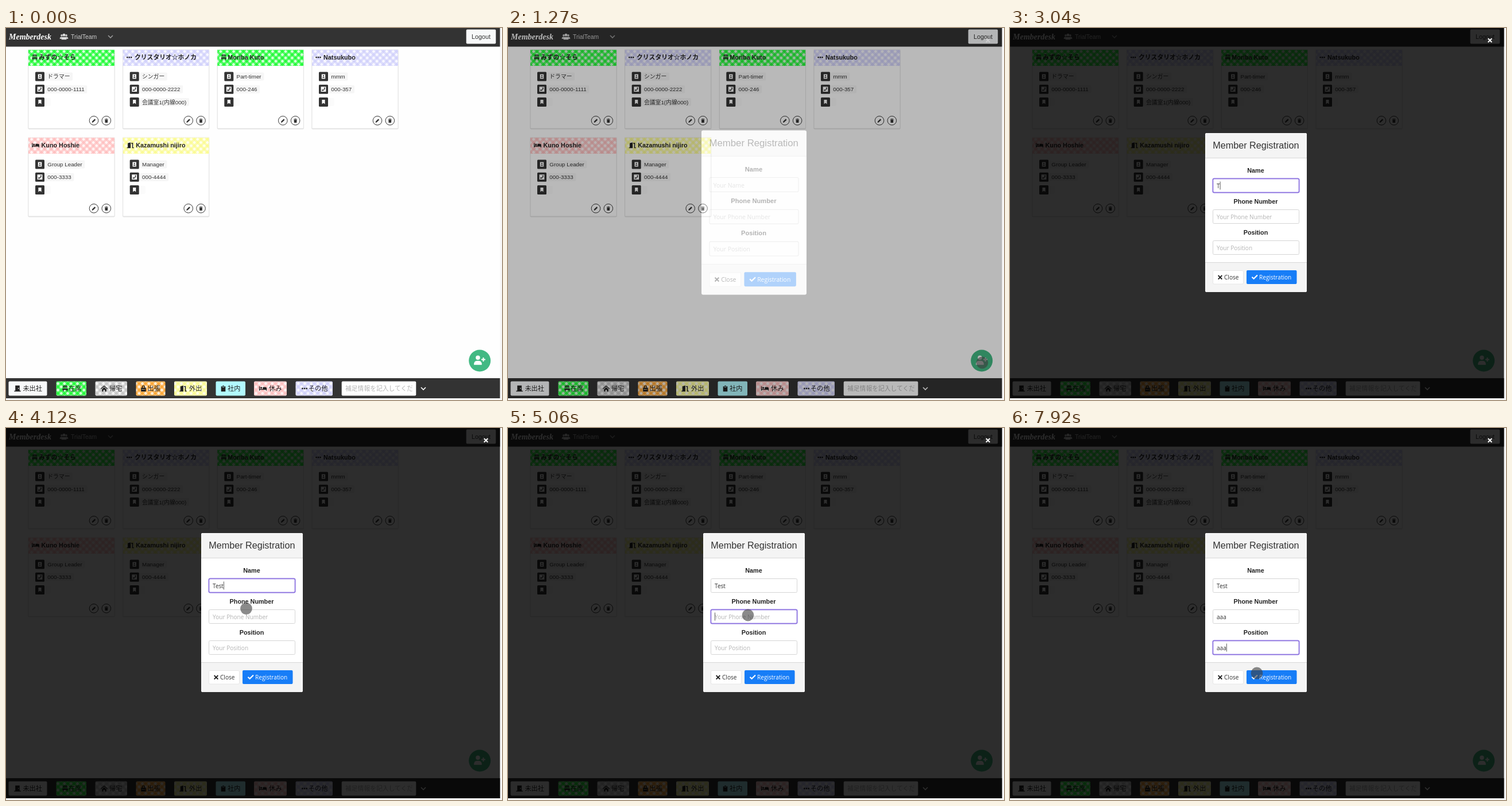
Write an HTML page that moves like this. It is 864 px wide and 648 px high and loops after 8 s.

```html
<!DOCTYPE html>
<html lang="ja">
<head>
<meta charset="utf-8">
<title>Member board</title>
<style>
html, body { margin: 0; width: 100%; height: 100%; overflow: hidden; background: #f7f7f7; }
svg { display: block; width: 864px; height: 648px; font: 9.8px "Liberation Sans", "Noto Sans CJK JP", "Noto Sans CJK", sans-serif; fill: #333; }
text { white-space: pre; }
.name, .label { font-size: 10.8px; font-weight: bold; fill: #222; }
.ui { font: 10.1px "Open Sans", "Noto Sans", sans-serif; }
.label, .mid { text-anchor: middle; }
.end { text-anchor: end; }
</style>
</head>
<body>
<svg id="stage" viewBox="0 0 864 648"></svg>
<script>
const LOOP = 8000;
const svg = document.getElementById('stage');

const COLORS = {
  green: '#00fa1a', lavender: '#ccccfa', pink: '#ffb8b8', yellow: '#fafa86',
  orange: '#ff9a18', gray: '#bebebe', cyan: '#b2f9ff', white: '#f8f9fa'
};
const PLAIN = ['cyan', 'white'];
const paint = c => PLAIN.includes(c) ? COLORS[c] : `url(#${c})`;

// Glyphs are centred on 0,0.
const GLYPHS = {
  chair: 'M-4-1v-3q0-1.5 1.5-1.5h5q1.5 0 1.5 1.5v3h-1.3v-3h-1v3h-1.1v-3h-1.2v3h-1.1v-3h-1v3zM-5 0h10v2.5h-1v3h-1.3v-3h-5.4v3h-1.3v-3h-1z',
  door: 'M-6 4h2v-9.5h8v9.5h2v1.5h-12zM1-1h1.6v1.6h-1.6z',
  doorOpen: 'M-6.5 4h1.5v-8l5.5-1.5v11h-7zM1.5-4.5h3.5v8.5h1.5v1.5h-3.2v-8.5h-1.8z',
  home: 'M-6.5 0L0-5.5 6.5 0l-1 1L0-3.7-5.5 1zM-4 1.2L0-2.3 4 1.2v4.3h-2.6v-3h-2.8v3h-2.6z',
  bag: 'M-4.5-1.5h1.7v-2q0-2 2-2h1.6q2 0 2 2v2h1.7v7h-9zM-1.4-1.5h2.8v-2.4h-2.8zM-3 1h6v.9h-6z',
  clip: 'M-4-4h2.5q0-1.5 1.5-1.5t1.5 1.5h2.5v9.5h-8zM-2-2.5h4v-1h-4z',
  bed: 'M-7-4h1.4v5h5.4v-3.6h4.4q2.8 0 2.8 2.6v4h-1.4v-1.6h-11.2v1.6h-1.4zM-4.8-1.2a1.7 1.7 0 1 1 3.4 0a1.7 1.7 0 1 1-3.4 0z',
  dots: 'M-5-1.2h2.5v2.4h-2.5zM-1.2-1.2h2.5v2.4h-2.5zM2.6-1.2h2.5v2.4h-2.5z',
  pencil: 'M-4 4l.7-2.7L1.8-3.8 3.8-1.8-1.3 3.3z',
  trash: 'M-3.5-3.6h2.2l.6-.8h1.4l.6.8h2.2v1h-7zM-3-2h6l-.4 6h-5.2z',
  times: 'M-4-2.6l1.4-1.4L0-1.4 2.6-4 4-2.6 1.4 0 4 2.6 2.6 4 0 1.4-2.6 4-4 2.6-1.4 0z',
  check: 'M-5.5.5l1.5-1.6 2.4 2.3L4-4.2 5.5-2.7-1.6 4.3z',
  id: 'M-4-5h8v10h-8zM-1.4-1.8a1.4 1.4 0 1 1 2.8 0a1.4 1.4 0 1 1-2.8 0zM-2.4 2.8q0-2.2 2.4-2.2t2.4 2.2z',
  phone: 'M-5.5-5.5h11v11h-11zM-3.6 3.6q7.2 0 7.2-7.2l-1.9-.4-1 2.3 1 .8q-.7 1.5-2.2 2.2l-.8-1-2.3 1z',
  bookmark: 'M-3.2-5h6.4v9.6L0 2l-3.2 2.6z',
  person: 'M-3-3.5a3 3 0 1 1 6 0a3 3 0 1 1-6 0zM-5.5 6.5q0-5.5 4-5.5h3q4 0 4 5.5z',
  plus: 'M-1-3.5h2v2.5h2.5v2h-2.5v2.5h-2v-2.5h-2.5v-2h2.5z'
};

const rect = (x, y, w, h, fill, extra = '') =>
  `<rect x="${x}" y="${y}" width="${w}" height="${h}" fill="${fill}" ${extra}/>`;
const text = (x, y, s, extra = '') => `<text x="${x}" y="${y}" ${extra}>${s}</text>`;
const glyph = (name, x, y, fill = '#333', k = 1) =>
  `<path d="${GLYPHS[name]}" fill="${fill}" fill-rule="evenodd" transform="translate(${x} ${y}) scale(${k})"/>`;
const chevron = (x, y, color) =>
  `<path d="M${x - 4} ${y - 2}l4 4 4-4" fill="none" stroke="${color}" stroke-width="1.6"/>`;

const gingham = ([id, c]) => `<pattern id="${id}" width="8" height="8" patternUnits="userSpaceOnUse" patternTransform="rotate(45)">
  ${rect(0, 0, 8, 8, '#fff')}${rect(0, 0, 8, 8, c, 'opacity=".15"')}
  ${rect(0, 0, 4, 8, c, 'opacity=".6"')}${rect(0, 0, 8, 4, c, 'opacity=".6"')}</pattern>`;

function card(x, y, color, icon, name, nameX, lines) {
  const row = (kind, i) => {
    const cy = 46.5 + i * 22.2, s = lines[i] || '';
    return rect(12, cy - 8, 16, 16, '#333', 'rx="1.5"') + glyph(kind, 20, cy, '#fff', .8) +
      `<g class="pill">${rect(29, cy - 7, 10, 14, s ? '#f6f6f6' : '#fbfbfb', 'rx="2"')}${text(33.3, cy + 3.7, s)}</g>`;
  };
  const round = (kind, cx) =>
    `<circle cx="${cx}" cy="123.3" r="7.8" fill="none" stroke="#333"/>` + glyph(kind, cx, 123.5, '#333', .85);
  return `<g transform="translate(${x} ${y})">
    ${rect(-.5, .5, 151, 138, '#000', 'opacity=".1" rx="2"')}
    ${rect(0, 0, 150, 137, '#fff', 'stroke="#dedede" stroke-width=".8"')}
    ${rect(0, 0, 150, 28, paint(color))}
    ${glyph(icon, icon === 'bed' ? 12.5 : icon === 'doorOpen' ? 13 : 11, 13.2, '#222', .92)}
    ${text(nameX, 17, name, 'class="name"')}
    ${['id', 'phone', 'bookmark'].map(row).join('')}
    ${round('pencil', 114)}${round('trash', 135.8)}</g>`;
}

function status(x1, x2, color, icon, label) {
  return rect(x1 - .5, 615.5, x2 - x1 + 1, 25, paint(color), 'rx="2"') +
    glyph(icon, x1 + (icon === 'bag' || icon === 'clip' ? 12.5 : 15), 628, '#222', .95) +
    text(x2 - 8, 632, label, 'class="end" font-size="11.2" fill="#222"');
}

const page = `
  ${rect(0, 0, 860.5, 645, '#fefefe')}
  ${rect(0, 0, 860.5, 32.5, '#333')}
  ${text(5, 19.5, 'Memberdesk', 'font-family="Liberation Serif, serif" font-style="italic" font-weight="bold" font-size="14" fill="#fff"')}
  ${glyph('person', 97, 15, '#ccc', .6)}${glyph('person', 105, 15, '#ccc', .6)}${glyph('person', 101, 15, '#ddd', .8)}
  ${text(113, 19, 'TrialTeam', 'font-size="10.4" fill="#ccc"')}
  ${chevron(182, 15, '#999')}
  ${rect(801.7, 2.4, 51.6, 25, '#f8f9fa', 'rx="2"')}
  ${text(827.5, 19, 'Logout', 'class="mid" font-size="10.8"')}
  ${card(39, 38, 'green', 'chair', 'みずの☆そら', 18, ['ドラマー', '000-0000-1111'])}
  ${card(203.7, 38, 'lavender', 'dots', 'クリスタリオ☆ホノカ', 20.3, ['シンガー', '000-0000-2222', '会議室1(内線000)'])}
  ${card(368.3, 38, 'green', 'chair', 'Moriba Kuto', 18, ['Part-timer', '000-246'])}
  ${card(533, 38, 'lavender', 'dots', 'Natsukubo', 20, ['mmm', '000-357'])}
  ${card(39, 191, 'pink', 'bed', 'Kuno Hoshie', 22.5, ['Group Leader', '000-3333'])}
  ${card(203.7, 191, 'yellow', 'doorOpen', 'Kazamushi nijiro', 22.5, ['Manager', '000-4444'])}
  <circle cx="825.2" cy="579.5" r="19" fill="#42b983"/>
  ${glyph('person', 822, 578.5, '#fff', 1.25)}${glyph('plus', 831.5, 577.5, '#fff', 1)}
  ${rect(0, 610, 860.5, 35, '#333')}
  ${status(5, 71, 'white', 'door', '未出社')}
  ${status(88, 139.5, 'green', 'chair', '在席')}
  ${status(156, 210.5, 'gray', 'home', '帰宅')}
  ${status(227, 277, 'orange', 'bag', '出張')}
  ${status(293.5, 349.5, 'yellow', 'doorOpen', '外出')}
  ${status(366, 416.5, 'cyan', 'clip', '社内')}
  ${status(432.5, 488.5, 'pink', 'bed', '休み')}
  ${status(505, 568.5, 'lavender', 'dots', 'その他')}
  ${rect(584.7, 615.5, 129.6, 25, '#fff', 'rx="2"')}
  <g clip-path="url(#note)">${text(591, 632, '補足情報を記入してください', 'font-size="10.8" fill="#b5b5b5"')}</g>
  ${chevron(727, 628, '#fff')}`;

const FIELDS = [
  { label: 'Name', y: 262, hint: 'Your Name', value: 'Test', keys: [3040, 3650, 3730, 3800], focus: [2430, 4890] },
  { label: 'Phone Number', y: 316, hint: 'Your Phone Number', value: 'aaa', keys: [5520, 5750, 5900], focus: [4980, 6450] },
  { label: 'Position', y: 370, hint: 'Your Position', value: 'aaa', keys: [7140, 7310, 7540], focus: [6450, LOOP] }
];

const field = f => `
  ${text(428, f.y - 10, f.label, 'class="label"')}
  ${rect(353.5, f.y + .5, 150, 24, '#fff', 'rx="2" stroke="#d5d5d5"')}
  <g class="ring">${rect(353, f.y, 151, 25, 'none', 'rx="3" stroke="#c9bdf5" stroke-width="2.6" opacity=".6"')}
  ${rect(353.5, f.y + .5, 150, 24, 'none', 'rx="2" stroke="#8468dc" stroke-width="1.4"')}</g>
  ${text(360, f.y + 17, '', 'class="ui value"')}
  ${rect(360, f.y + 5.5, 1, 14, '#333', 'class="caret"')}`;

const modal = `
  ${rect(340, 183, 177, 277, '#fff', 'rx="3"')}
  <path d="M340 226v-40q0-3 3-3h171q3 0 3 3v40zM340 408v49q0 3 3 3h171q3 0 3-3v-49z" fill="#f4f4f4"/>
  <path d="M340 226.5h177M340 408.5h177" stroke="#d8d8d8"/>
  ${text(428.3, 210, 'Member Registration', 'class="mid" font-size="16.2"')}
  ${FIELDS.map(field).join('')}
  ${rect(353.5, 422.5, 53, 23.5, '#fff', 'rx="2" stroke="#e6e6e6"')}
  ${glyph('times', 366, 434.3, '#222')}${text(373, 438, 'Close', 'class="ui"')}
  ${rect(412, 422, 87.5, 24, '#177df7', 'rx="2"')}
  ${glyph('check', 426.2, 434, '#fff')}${text(434, 438, 'Registration', 'class="ui" fill="#fff"')}`;

svg.innerHTML = `
  <defs>${Object.entries(COLORS).map(gingham).join('')}
    <clipPath id="note">${rect(585, 616, 123, 24, '#fff')}</clipPath></defs>
  ${page}
  <path id="shade" fill="#000" fill-rule="evenodd"/>
  <g id="modal">${modal}</g>
  <g id="cross">${glyph('times', 836, 21.5, '#fff')}</g>
  <circle id="cursor" r="10.4"/>`;

const get = id => document.getElementById(id);
const shade = get('shade'), dialog = get('modal'), cross = get('cross'), cursor = get('cursor');
const parts = name => [...dialog.querySelectorAll('.' + name)];
const rings = parts('ring'), values = parts('value'), carets = parts('caret');

for (const pill of svg.querySelectorAll('.pill')) {
  const w = pill.lastChild.getComputedTextLength();
  if (w) pill.firstChild.setAttribute('width', w + 9);
}

// Spans that advance in even steps: start, end, number of steps.
const STEPS = [[180, 950, 11], [1190, 1970, 11], [2050, 2590, 8], [3650, 4280, 9], [6070, 6680, 9], [7770, 7920, 3]];
// Pointer path: time, x, y.
const PATH = [[180, 815, 646], [870, 826, 583], [1500, 826, 583], [1890, 411, 248], [1970, 412, 244],
  [2280, 420, 278], [3880, 420, 278], [4120, 418, 326], [6000, 418, 326], [6300, 407, 390],
  [7770, 407, 390], [7920, 430, 427]];
const HIDDEN = [[0, 180], [2730, 3880], [6920, 7770]];
const CLICKS = [[1040, 1190], [2350, 2500], [4185, 4280], [4890, 5060], [6380, 6530]];

const within = (t, [a, b]) => t >= a && t < b;
const clamp = v => Math.max(0, Math.min(1, v));
const smooth = v => v * v * (3 - 2 * v);

function stepped(t) {
  const s = STEPS.find(([a, b]) => t >= a && t <= b);
  if (!s) return t;
  const size = (s[1] - s[0]) / (s[2] - 1);
  return s[0] + Math.floor((t - s[0]) / size + 1e-6) * size;
}

function pointerAt(t) {
  const i = PATH.findIndex(p => p[0] > t);
  if (i <= 0) return PATH[i < 0 ? PATH.length - 1 : 0].slice(1);
  const [a, b] = [PATH[i - 1], PATH[i]];
  const k = smooth((t - a[0]) / (b[0] - a[0]));
  return [a[1] + (b[1] - a[1]) * k, a[2] + (b[2] - a[2]) * k];
}

function drawField(f, i, t, flash) {
  const focused = within(t, f.focus);
  const typed = f.value.slice(0, f.keys.filter(k => t >= k).length);
  const value = values[i];
  value.textContent = typed || f.hint;
  value.setAttribute('fill', typed ? '#333' : '#b4b4b4');
  rings[i].setAttribute('opacity', focused ? (flash ? .35 : 1) : 0);
  const caretOn = focused && !flash && !within(t, [3420, 3650]);
  carets[i].setAttribute('opacity', caretOn ? .8 : 0);
  carets[i].setAttribute('x', 360 + (typed ? value.getComputedTextLength() : 0));
}

function draw(time) {
  const t = stepped(time);
  const flash = within(time, [4190, 4280]);
  const open = t < 1190 ? 0 : clamp((t - 1165) / 310);
  const k = 1 + .05 * (1 - open), dx = flash ? 1.5 : 0;

  // The dimmed area surrounds the dialog, so the page shows through while it fades in.
  const w = 177 * k, h = 277 * k, x = 428.5 - w / 2 + dx, y = 321.5 - h / 2;
  shade.setAttribute('d', `M0 0H860.5V645H0zM${x + 3} ${y}h${w - 6}q3 0 3 3v${h - 6}q0 3-3 3h${6 - w}q-3 0-3-3v${6 - h}q0-3 3-3z`);
  shade.setAttribute('opacity', flash ? .925 : .825 * open);
  dialog.setAttribute('opacity', open);
  dialog.setAttribute('transform', `translate(${428.5 + dx} 321.5) scale(${k}) translate(-428.5 -321.5)`);
  cross.setAttribute('opacity', open);
  cross.setAttribute('transform', `translate(${dx} 0)`);
  FIELDS.forEach((f, i) => drawField(f, i, time, flash));

  const [cx, cy] = pointerAt(t);
  const clicked = CLICKS.some(c => within(time, c));
  cursor.setAttribute('cx', cx);
  cursor.setAttribute('cy', cy);
  cursor.setAttribute('fill', clicked ? '#bcc13a' : '#3c3c3c');
  cursor.setAttribute('opacity', HIDDEN.some(s => within(time, s)) ? 0 : clicked ? .95 : .6);
}

const start = performance.now();
function tick() {
  draw((performance.now() - start) % LOOP);
  requestAnimationFrame(tick);
}
tick();
</script>
</body>
</html>
```
